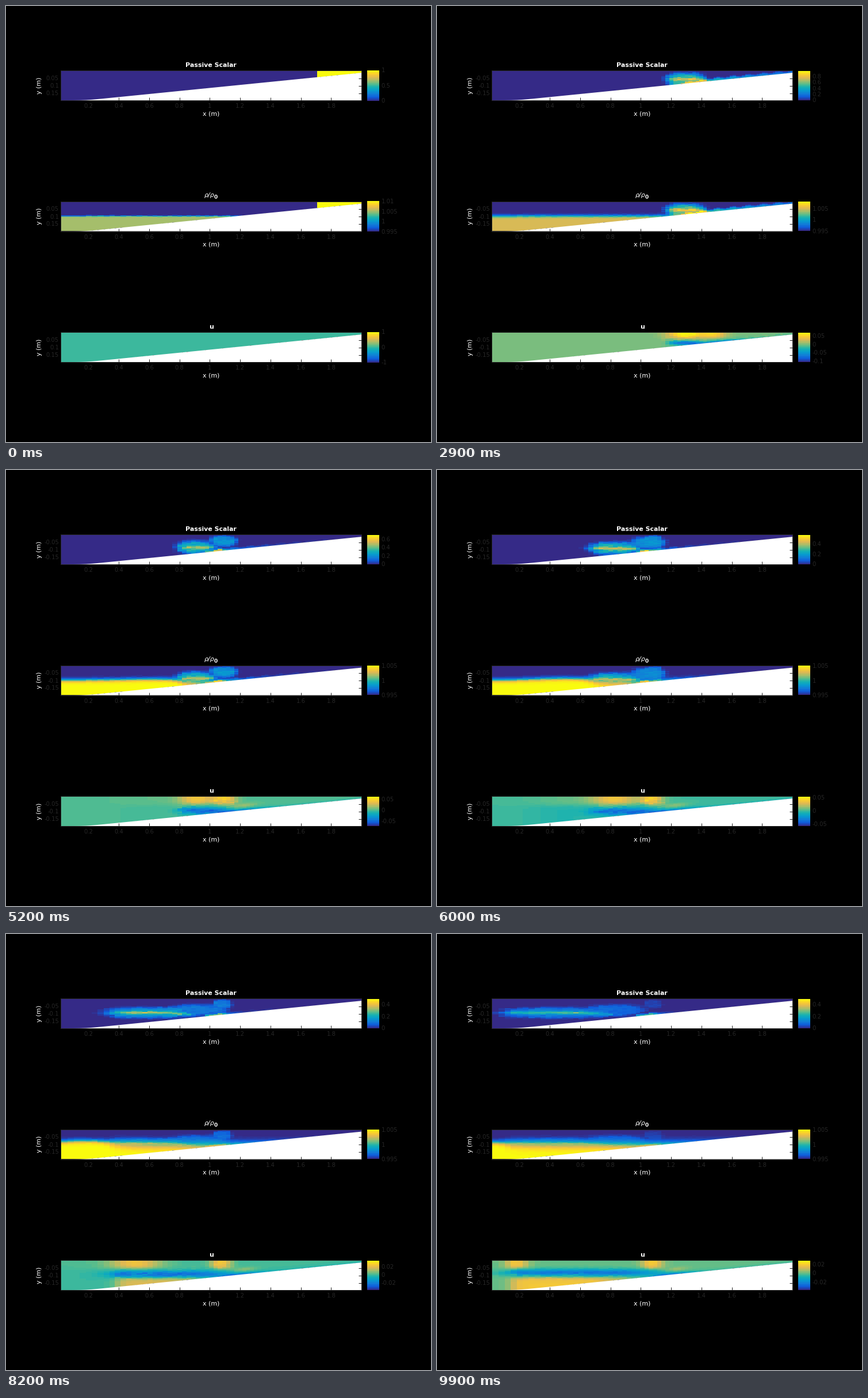
A matplotlib script that plays this animation: 739 by 758 pixels, repeating every 10 s.

```python
import numpy as np
import matplotlib.pyplot as plt
from matplotlib.animation import FuncAnimation
from matplotlib.colors import LinearSegmentedColormap
from matplotlib.patches import Polygon, Rectangle

W, H, DPI = 739, 758, 100
FRAMES, STEP = 100, 100
LEFT, RIGHT, DEPTH = 96, 618, 51
TOPS = (113, 340.5, 568)
DAM = 540
GREY = "#262626"
PARULA = LinearSegmentedColormap.from_list("parula", [
    "#352a87", "#0f5cdd", "#127dd8", "#079ccf", "#15b1b4",
    "#59bd8c", "#a5be6b", "#e1b952", "#fcce2e", "#f9fb0e"], N=64)

plt.rcParams["font.family"] = "DejaVu Sans"
fig = plt.figure(figsize=(W / DPI, H / DPI), dpi=DPI, facecolor="black")
ax = fig.add_axes([0, 0, 1, 1])


def px(n):
    return n * 72 / DPI


def sig(v):
    return 1 / (1 + np.exp(-np.clip(v, -40, 40)))


def gauss(v, w):
    return np.exp(-(v / w) ** 2)


def ramp(t, a, b):
    """Smooth step from 0 at a to 1 at b."""
    s = np.clip((t - a) / (b - a), 0, 1)
    return s * s * (3 - 2 * s)


def floor(x):
    """Depth of the bed below the surface, in pixels."""
    s = 0.7
    line = 3.1 + (RIGHT - x) * 0.1
    return -s * np.log(np.exp(-line / s) + np.exp(-DEPTH / s))


# Grid: columns narrow to the right, layers follow the bed
COLS, LAYERS = 75, 26
span = 1 - np.exp(-np.arange(COLS + 1) / COLS)
edges = LEFT + (RIGHT - LEFT) * span / span[-1]
levels = np.linspace(0, 1, LAYERS + 1)[:, None]
X = np.tile((edges[1:] + edges[:-1]) / 2, (LAYERS, 1))
bed = floor(X)
D = (levels[1:] + levels[:-1]) / 2 * bed
UP = bed - D

rng = np.random.default_rng(4)
noise = rng.normal(size=X.shape)
noise = (noise + np.roll(noise, 1, 0) + np.roll(noise, 1, 1)) / 1.7


def blob(x, y, a, b):
    r = np.sqrt(np.abs((X - x) / a) ** 3 + ((D - y) / b) ** 2)
    return sig((1 - r + 0.06 * noise) * 6)


class Current:
    """Front and head of the dense current at time t, in seconds."""

    def __init__(self, t):
        self.front = DAM - 50 * t + 0.75 * t * t
        self.a = 31 * ramp(t, -0.3, 2.5) + 13.5 * max(t - 5.2, 0)
        self.x = self.front + self.a
        base = floor(self.x)
        self.y = min(0.69 * base, 24)
        self.b = min(0.45 * base, 10.5 - 2 * ramp(t, 4, 8))


def scalar(t, cur):
    lock = sig((X - DAM - 40 * t) / (0.2 + t))

    # Thin wavy layer left on the bed, strongest where the head lifts off
    foot = max(cur.front + 50, 365)
    fade = min(np.exp(-(t - 1.3) / 2.3), 1)
    amp = fade * np.exp(-np.maximum(X - foot, 0) / (60 + 2000 * np.exp(-t)))
    amp = amp + 0.65 * np.exp(-t / 12) * ramp(t, 1.5, 2.9) * gauss(X - foot, 22)
    thick = (2 + 4 * np.exp(-t / 2)) * (1 + 0.4 * np.sin((X + 16 * t) / 4.2))
    tail = amp * sig((thick - UP) / 0.8) * sig((X - max(cur.front, 340) - 5) / 3)

    head = 0.95 * np.exp(-t / 4.6) * blob(cur.x, cur.y, cur.a, cur.b)
    off = (X - cur.x) / cur.a
    bend = 4 * ramp(t, 5, 8) * np.maximum(off, 0) ** 2
    core = 0.3 * np.exp(-t / 14) * gauss(D - cur.y - bend, 2.5) * np.exp(-off ** 4)

    # Mixed fluid that rises behind the head and spreads
    age = t - 5.2
    strength = 0.62 * np.exp(-t / 4.8) * ramp(t, 3, 5)
    plume = strength * blob(378 - 14.5 * age, np.clip(11 + 4 * age, 9, 19),
                            np.clip(22 + 8 * age, 16, 50), 8.5)
    puff = strength * (1 - 0.6 * ramp(t, 8, 10)) * blob(376, 9, 15, 7)

    c = np.maximum.reduce([tail, head, plume, puff]) + core
    c = c * (1 + 0.08 * noise) * min(5 * t, 1)
    return np.maximum(lock, np.clip(c, 0, 1))


def bulge(t, cur):
    """Rise of the interface ahead of the front."""
    return 6 * gauss(t - 8.2, 2.5) * gauss(X - cur.front + 45, 65)


def density(t, cur, c):
    zone = sig((X - cur.front - 4) / 6)
    push = 6 * np.exp(-max(t - 5.2, 0) / 2.5) * ramp(t, 3, 5)
    depth = 25 - bulge(t, cur) + zone * push
    width = 2 - 1.5 * np.exp(-t / 3) + zone * 1.8 * ramp(t, 4, 7)
    amb = sig((D - depth) / width)
    return 0.995 + 0.010 * amb + 0.015 * c * (1 - amb)


def velocity(t, cur, c, lo, hi):
    front, low = cur.front, -lo

    # Return flow along the surface
    w = min(cur.a, 45) - 25 * ramp(t, 8.2, 9.9)
    top = (1 - 0.35 * ramp(t, 2.9, 5)) * gauss(X - front - w, w)
    top = top + 0.7 * gauss(X - max(front + 80, 374), 18 + 18 * np.exp(-t / 2))
    u = hi * top * sig((0.45 * cur.y + 2 - D) / 1.8)

    # Current under it, fastest at the nose later on
    end = max(front + 55, 388)
    band = gauss(D - cur.y - 3 + 6 * ramp(t, 6.5, 9.9), 0.27 * cur.y)
    band = band * np.exp(-((2 * X - front - end) / (end - front)) ** 4)
    u = u - 0.65 * low * band * (1 + 0.45 * ramp(t, 6, 8) * gauss(X - front - 20, 16))

    # Flow down the slope and the eddy above it
    foot = max(front + 80, 403)
    u = u - 0.6 * low * np.exp(-UP / 2.5) * gauss(X - foot, 45)
    u = u - 0.12 * low * np.exp(-UP / 2) * sig((X - foot) / 15)
    u = u + 0.25 * hi * ramp(t, 2, 4) * gauss(X - 414, 22) * gauss(UP - 8, 4)

    # Backflow in the lower layer, and the wave running ahead
    u = u + 0.018 * ramp(t, 5.5, 8) * sig((D - 30) / 2) * sig((X - front - 12) / 6) * np.exp(
        -np.maximum(X - front - 150, 0) / 100)
    u = u + 0.002 * (1 - ramp(t, 7, 8.5)) * bulge(t, cur) * np.tanh((15 - D) / 4)
    return u + 0.08 * hi * noise * np.minimum(c * 5, 1) * min(t, 1)


def text(x, y, s, size=10, color=GREY, **kw):
    return ax.text(x, y, s, fontsize=px(size), color=color, **kw)


class Panel:
    def __init__(self, top):
        self.top = top
        end = top + DEPTH
        ax.add_patch(Rectangle((LEFT - 1, top - 1), RIGHT - LEFT + 2, DEPTH + 2, fc=GREY, lw=0))
        self.mesh = ax.pcolormesh(
            np.tile(edges, (LAYERS + 1, 1)), top + levels * floor(edges), np.zeros_like(X),
            cmap=PARULA, antialiased=False, zorder=2)
        slope = np.column_stack([edges, top + floor(edges)])
        ax.add_patch(Polygon(np.vstack([slope, [(RIGHT, end), (LEFT, end)]]),
                             fc="white", lw=0, zorder=3))

        line = dict(color=GREY, lw=px(1), zorder=4, solid_capstyle="butt")
        for k in range(1, 10):
            x = 90.5 + 52.75 * k
            if floor(x) < DEPTH - 3:
                ax.plot([x, x], [end - 5, end], **line)
            text(x + 0.2, end + 13.1, f"{k / 5:g}", ha="center")
        self.ylabels = []
        for k in (1, 2, 3):
            y = top - 0.5 + 13 * k
            ax.plot([RIGHT - 5, RIGHT], [y, y], **line)
            self.ylabels.append(text(92, y + 3.5, "", ha="right"))
        text(356.7, end + 26.2, "x (m)", 11, "white", ha="center")
        text(58, top + 25, "y (m)", 11, "white", ha="center", va="center", rotation=90)

        self.bar = ax.imshow(np.linspace(1, 0, 64)[:, None], cmap=PARULA, aspect="auto",
                             interpolation="nearest", extent=(628, 649, end, top), zorder=3)
        self.ticks = [text(652.5, 0, "") for _ in range(8)]

    def show(self, field, lo, hi, step, first):
        self.mesh.set_array(field)
        self.mesh.set_clim(lo, hi)
        y0, y1 = self.top - first, self.top + DEPTH + first
        self.bar.set_extent((628, 649, y1, y0))
        k0, k1 = int(np.ceil(lo / step - 1e-6)), int(np.floor(hi / step + 1e-6))
        values = [k * step for k in range(k0, k1 + 1)]
        for n, tick in enumerate(self.ticks):
            if n < len(values):
                v = values[n]
                tick.set_text(f"{round(v, 4) + 0:g}")
                tick.set_y(y1 - (v - lo) / (hi - lo) * (y1 - y0) + 3.3)
            else:
                tick.set_text("")
        sign = "" if first else "-"
        for label, v in zip(self.ylabels, ("0.05", "0.1", "0.15")):
            label.set_text(sign + v)


panels = [Panel(top) for top in TOPS]
text(356.7, 106, "Passive Scalar", 11, "white", ha="center", weight="bold")
text(345, 331.5, "ρ/ρ", 11, "white", style="italic")
text(362, 335, "0", 9, "white", weight="bold")
text(356.7, 561, "u", 11, "white", ha="center", weight="bold")
ax.set(xlim=(0, W), ylim=(H, 0), aspect="auto")
ax.axis("off")


def update(frame):
    t = frame * STEP / 1000
    first = frame == 0
    cur = Current(t)

    c = scalar(t, cur)
    hi = 1 - 0.505 * ramp(t, 2.5, 7.3)
    panels[0].show(c, 0, hi, 0.5 if hi > 0.995 else 0.2, first)

    hi = 1.0101 - 0.005 * ramp(t, 1.3, 5)
    coarse = hi >= 1.01 and not first
    panels[1].show(density(t, cur, c), 0.995, hi, 0.01 if coarse else 0.005, first)

    # The colour range follows the speeds; still water gets a range of one
    hi = 0.012 + 0.058 * ramp(t, 0, 1.9) - 0.042 * ramp(t, 3.3, 9.8)
    lo = -0.015 - 0.091 * ramp(t, 0, 1.6) + 0.069 * ramp(t, 2.5, 8)
    step = 0.05 if hi - lo > 0.1 else 0.02 if hi - lo > 0.05 else 0.01
    u = velocity(t, cur, c, lo, hi)
    if first:
        u, lo, hi, step = 0 * u, -1, 1, 1
    panels[2].show(u, lo, hi, step, first)
    return []


anim = FuncAnimation(fig, update, frames=FRAMES, interval=STEP, repeat=True,
                     repeat_delay=0, init_func=lambda: update(0), blit=False)
plt.show()
```
